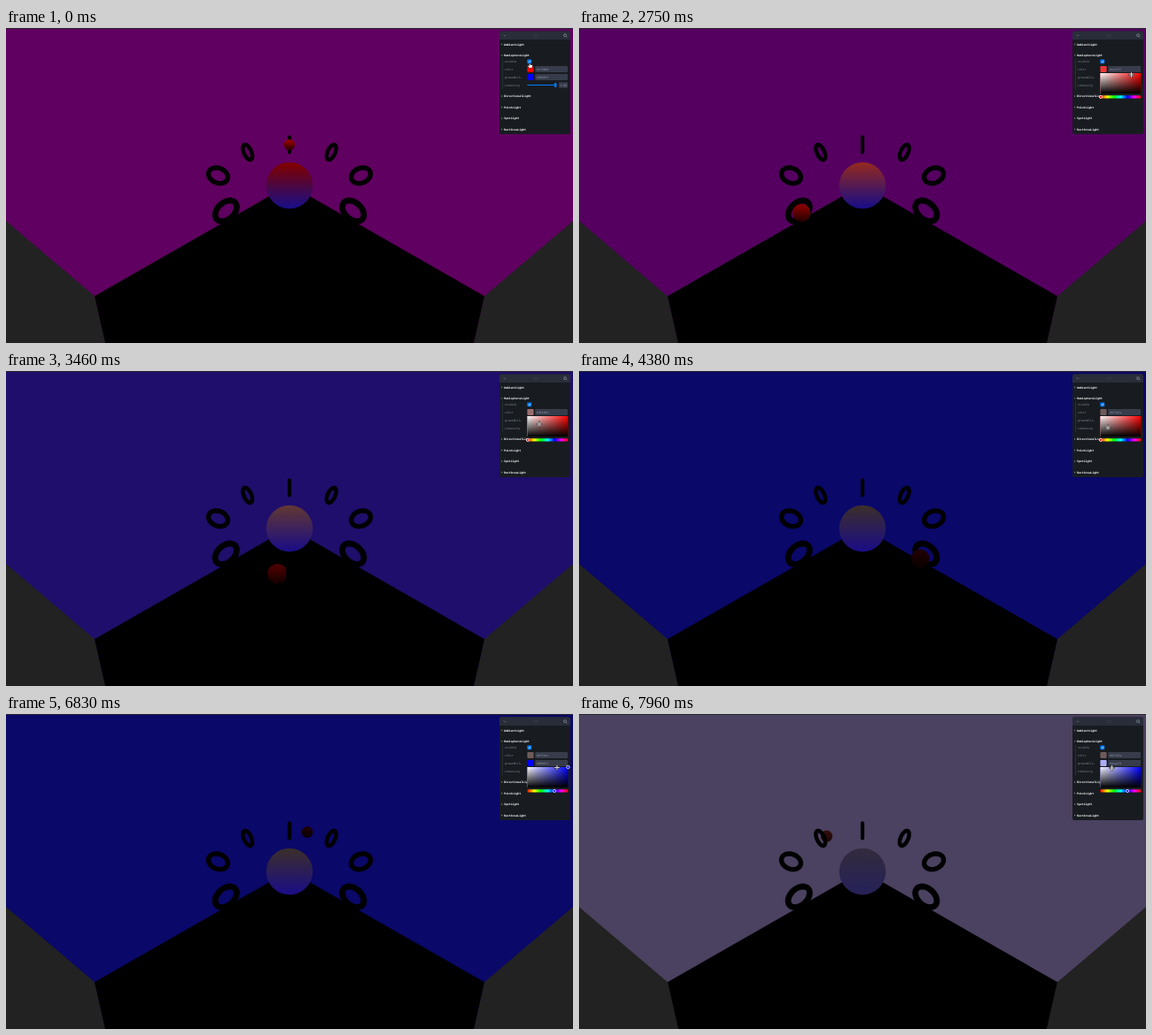
An HTML page that plays this animation: 640 px wide and 356 px high, repeating every 8 s.

```html
<!DOCTYPE html>
<html lang="en">
<head>
<meta charset="utf-8">
<title>Hemisphere light</title>
<style>
  html, body { margin: 0; width: 100%; height: 100%; overflow: hidden; background: #000; }
  svg { display: block; width: 100%; height: 100%; }
  text { font: 3.2px "DejaVu Sans Mono", "Noto Sans Mono", monospace; fill: #8c92a4; }
  .folder { font-weight: bold; fill: #fefefe; }
</style>
</head>
<body>
<svg id="stage" viewBox="0 0 640 356">
  <defs>
    <linearGradient id="ballFill" x2="0" y2="1">
      <stop offset=".05"/><stop offset=".95"/>
    </linearGradient>
    <linearGradient id="moonFill" x2="0" y2="1">
      <stop offset=".2"/><stop offset="1"/>
    </linearGradient>
    <linearGradient id="hues"></linearGradient>
    <linearGradient id="white">
      <stop stop-color="#fff"/><stop offset="1" stop-color="#fff" stop-opacity="0"/>
    </linearGradient>
    <linearGradient id="black" x2="0" y2="1">
      <stop stop-opacity="0"/><stop offset="1"/>
    </linearGradient>
  </defs>

  <rect id="wall" width="640" height="356"/>
  <path fill="#222" d="M0 218L100 303L112 356H0ZM640 218L540 303L528 356H640Z"/>
  <path d="M320 177L540 303L528 356H112L100 303Z"/>
  <rect width="640" height="1" fill="#2c2830"/>
  <circle cx="320" cy="178" r="26.3" fill="url(#ballFill)"/>
  <g id="behind"></g>
  <circle id="moon" fill="url(#moonFill)"/>
  <g id="before"></g>

  <g id="panel">
    <rect x="557" y="3.5" width="80" height="116.5" rx="2" fill="#181c20"/>
    <path d="M557 13V5.5a2 2 0 0 1 2-2H635a2 2 0 0 1 2 2V13Z" fill="#292d39"/>
    <path d="M561.6 7.8l1.4 1.4l1.4-1.4" fill="none" stroke="#6c7282" stroke-width=".7"/>
    <g fill="#454a58">
      <circle cx="596" cy="7.6" r=".5"/><circle cx="598" cy="7.6" r=".5"/><circle cx="600" cy="7.6" r=".5"/>
      <circle cx="596" cy="9.4" r=".5"/><circle cx="598" cy="9.4" r=".5"/><circle cx="600" cy="9.4" r=".5"/>
    </g>
    <g fill="none" stroke="#8c92a4" stroke-width=".7">
      <circle cx="631" cy="8.2" r="1.5"/><path d="M632.1 9.3l1.2 1.2"/>
    </g>
    <path d="M560.5 35V69" stroke="#373c4b" stroke-width=".6"/>
    <rect x="588.4" y="35.4" width="4.8" height="4.8" rx=".8" fill="#007bff"/>
    <path d="M589.6 37.9l1 1l1.6-2" fill="none" stroke="#fff" stroke-width=".7"/>
    <rect x="588.4" y="64" width="33" height="1" fill="#007bff"/>
    <rect x="619" y="62" width="2.4" height="5" rx=".7" fill="#007bff"/>
    <rect x="624" y="61.2" width="10" height="6.6" rx=".8" fill="#373c4b"/>
    <text x="625.2" y="65.7">1.00</text>
  </g>

  <g id="picker">
    <rect x="588.4" width="46" height="29" fill="#181c20"/>
    <rect id="tone" x="588.4" width="46" height="23"/>
    <rect x="588.4" width="46" height="23" fill="url(#white)"/>
    <rect x="588.4" width="46" height="23" fill="url(#black)"/>
    <rect x="588.4" y="25.3" width="46" height="3.2" rx="1" fill="url(#hues)"/>
    <circle id="hueKnob" cy="26.9" r="1.6" stroke="#fff" stroke-width=".8"/>
    <circle id="knob" r="1.7" stroke="#fff" stroke-width=".8"/>
  </g>

  <path id="hand" fill="#fff" stroke="#000" stroke-width=".5"
    d="M-.6 0q.6-.7 1.2 0v2.2l2.2.5q.7.2.6 1l-.5 2.6h-3.4l-1.9-2.7q.3-.9 1.1-.3l.7.6Z"/>
  <g id="cross" fill="none">
    <path d="M-3.2 0H3.2M0-3.2V3.2" stroke="#222" stroke-width="2"/>
    <path d="M-2.8 0H2.8M0-2.8V2.8" stroke="#ddd" stroke-width="1"/>
  </g>
</svg>
<script>
const LOOP = 8000, RINGS = 8, ORBIT_SPEED = 50;
const PICK = { x: 588.4, w: 46, h: 23 };
const $ = id => document.getElementById(id);

function set(el, attrs) {
  for (const k in attrs) el.setAttribute(k, attrs[k]);
  return el;
}
function add(parent, tag, attrs, text) {
  const el = document.createElementNS("http://www.w3.org/2000/svg", tag);
  if (text) el.textContent = text;
  return parent.appendChild(set(el, attrs));
}
const clamp = v => Math.max(0, Math.min(1, v));
const mix = (a, b, p) => a.map((v, i) => v + (b[i] - v) * p);
const rgb = c => `rgb(${c.map(Math.round)})`;
const hex = c => "#" + c.map(v => Math.round(v).toString(16).padStart(2, "0")).join("");

// Rows are [position, ...values]; linear between rows.
function track(rows, at) {
  let i = 1;
  while (i < rows.length - 1 && at > rows[i][0]) i++;
  const [a, b] = [rows[i - 1], rows[i]];
  return mix(a.slice(1), b.slice(1), clamp((at - a[0]) / (b[0] - a[0])));
}

// Perspective of the scene; the orbit has radius 1.
function project(x, up, back) {
  const z = 1 + 0.285 * back - 0.214 * up;
  return { x: 320 + 80.5 * x / z, y: 178 - (11 + 48.1 * back + 64.5 * up) / z, z };
}
const onOrbit = (a, r = 1, up = 0) => project(-Math.sin(a) * r, up, Math.cos(a) * r);

const rings = Array.from({ length: RINGS }, (_, n) => {
  const a = n * 2 * Math.PI / RINGS;
  const pts = Array.from({ length: 32 }, (_, i) => {
    const u = i * Math.PI / 16;
    const p = onOrbit(a, 1 + 0.133 * Math.cos(u), 0.133 * Math.sin(u));
    return p.x.toFixed(2) + " " + p.y.toFixed(2);
  });
  const el = add($("before"), "path", {
    d: "M" + pts.join("L") + "Z", fill: "none", stroke: "#000",
    "stroke-width": 5.37 / onOrbit(a).z, "stroke-linejoin": "round"
  });
  return { el, depth: Math.cos(a) };
});

const panel = $("panel");
[["AmbientLight", 18.5], ["HemisphereLight", 31, 1], ["DirectionalLight", 77],
 ["PointLight", 89.5], ["SpotLight", 102], ["RectAreaLight", 114.5]].forEach(([name, y, open]) => {
  add(panel, "path", { d: open ? `M558.8 ${y - .6}h2l-1 1.4Z` : `M559.2 ${y - 1}v2l1.4-1Z`, fill: "#8c92a4" });
  add(panel, "text", { x: 562, y: y + 1.2, class: "folder" }, name);
});
[["visible", 38], ["color", 46.5], ["groundCol…", 55.5], ["intensity", 64.5]].forEach(([name, y]) =>
  add(panel, "text", { x: 562.8, y: y + 1.1 }, name));

const fields = [46.5, 55.5].map(y => {
  add(panel, "rect", { x: 597.2, y: y - 3.4, width: 36.8, height: 6.8, rx: .8, fill: "#373c4b" });
  return {
    swatch: add(panel, "rect", { x: 588.4, y: y - 3.4, width: 7.2, height: 6.8, rx: .8 }),
    label: add(panel, "text", { x: 599, y: y + 1.2 }, "#")
  };
});
for (let i = 0; i <= 6; i++)
  add($("hues"), "stop", { offset: i / 6, "stop-color": `hsl(${i * 60},100%,50%)` });

// time, x, y
const POINTER = [
  [0, 591, 39], [950, 591, 39], [1300, 594, 47], [1900, 594, 47], [2500, 626, 52.5],
  [2800, 623, 53], [3250, 612, 54], [3460, 602, 60], [4080, 597, 64], [5100, 597, 64],
  [5450, 596, 68], [5900, 593, 56], [6300, 593, 56], [6700, 622, 60.5], [6950, 622, 60.5],
  [7450, 609, 60.5], [7960, 601.5, 61]
];
const SKY_DRAG = [2650, 4080], GROUND_DRAG = [6950, 7960];
const SKY_OPEN = [1400, 5500], GROUND_OPEN = [6200, LOOP];

// Keyed by the red of the sky light: wall rgb, ball top rgb, moon red
const LIT = [
  [117, 10, 8, 104, 58, 45, 45, 30],
  [164, 36, 16, 108, 104, 56, 56, 82],
  [225, 80, 0, 98, 150, 56, 50, 122],
  [255, 96, 0, 96, 125, 0, 0, 140]
];

function pick(t, [from, to], top, channel) {
  const [x, y] = t < from ? [PICK.x + PICK.w, top] : track(POINTER, Math.min(t, to));
  const s = clamp((x - PICK.x) / PICK.w), v = 1 - clamp((y - top) / PICK.h);
  const color = [0, 1, 2].map(i => 255 * v * (i === channel ? 1 : 1 - s));
  return { x, y, color };
}
const within = (t, [a, b]) => t >= a && t < b;

function paint(gradient, ...colors) {
  colors.forEach((c, i) => set($(gradient).children[i], { "stop-color": rgb(c) }));
}

function drawPicker(t, sky, ground) {
  const onSky = within(t, SKY_OPEN), onGround = within(t, GROUND_OPEN);
  $("picker").style.display = onSky || onGround ? "" : "none";
  const top = onGround ? 60 : 51, sel = onGround ? ground : sky;
  const pure = onGround ? "#00f" : "#f00";
  set($("picker"), { transform: `translate(0 ${top})` });
  set($("tone"), { fill: pure });
  set($("hueKnob"), { cx: PICK.x + PICK.w * (onGround ? 2 / 3 : .012), fill: pure });
  set($("knob"), { cx: sel.x, cy: sel.y - top, fill: rgb(sel.color) });
}

function drawPointer(t) {
  const [x, y] = track(POINTER, t);
  const cross = within(t, [2050, 5500]) || t > 6450;
  $("hand").style.display = cross ? "none" : "";
  $("cross").style.display = cross ? "" : "none";
  set($(cross ? "cross" : "hand"), { transform: `translate(${x} ${y})` });
}

function draw(t) {
  const sky = pick(t, SKY_DRAG, 51, 0), ground = pick(t, GROUND_DRAG, 60, 2);
  const lit = track(LIT, sky.color[0]);
  const pale = clamp(ground.color[0] / 176);
  set($("wall"), { fill: rgb(mix(lit.slice(0, 3), [76, 66, 96], pale)) });
  paint("ballFill", mix(lit.slice(3, 6), [50, 42, 62], pale), mix([28, 14, 130], [38, 34, 88], pale));
  paint("moonFill", [lit[6] + 18 * pale, 12 * pale, 10 * pale], [lit[6] * .25 + 18 * pale, 8 * pale, 8 * pale]);

  const a = t / 1000 * ORBIT_SPEED * Math.PI / 180, p = onOrbit(a);
  set($("moon"), { cx: p.x, cy: p.y, r: 8.05 / p.z });
  for (const ring of rings) {
    const layer = $(ring.depth <= Math.cos(a) ? "before" : "behind");
    if (ring.el.parentNode !== layer) layer.append(ring.el);
  }

  [sky, ground].forEach(({ color }, i) => {
    set(fields[i].swatch, { fill: rgb(color) });
    fields[i].label.textContent = hex(color);
  });
  drawPicker(t, sky, ground);
  drawPointer(t);
}

const start = performance.now();
function tick() {
  draw((performance.now() - start) % LOOP);
  requestAnimationFrame(tick);
}
tick();
</script>
</body>
</html>
```
